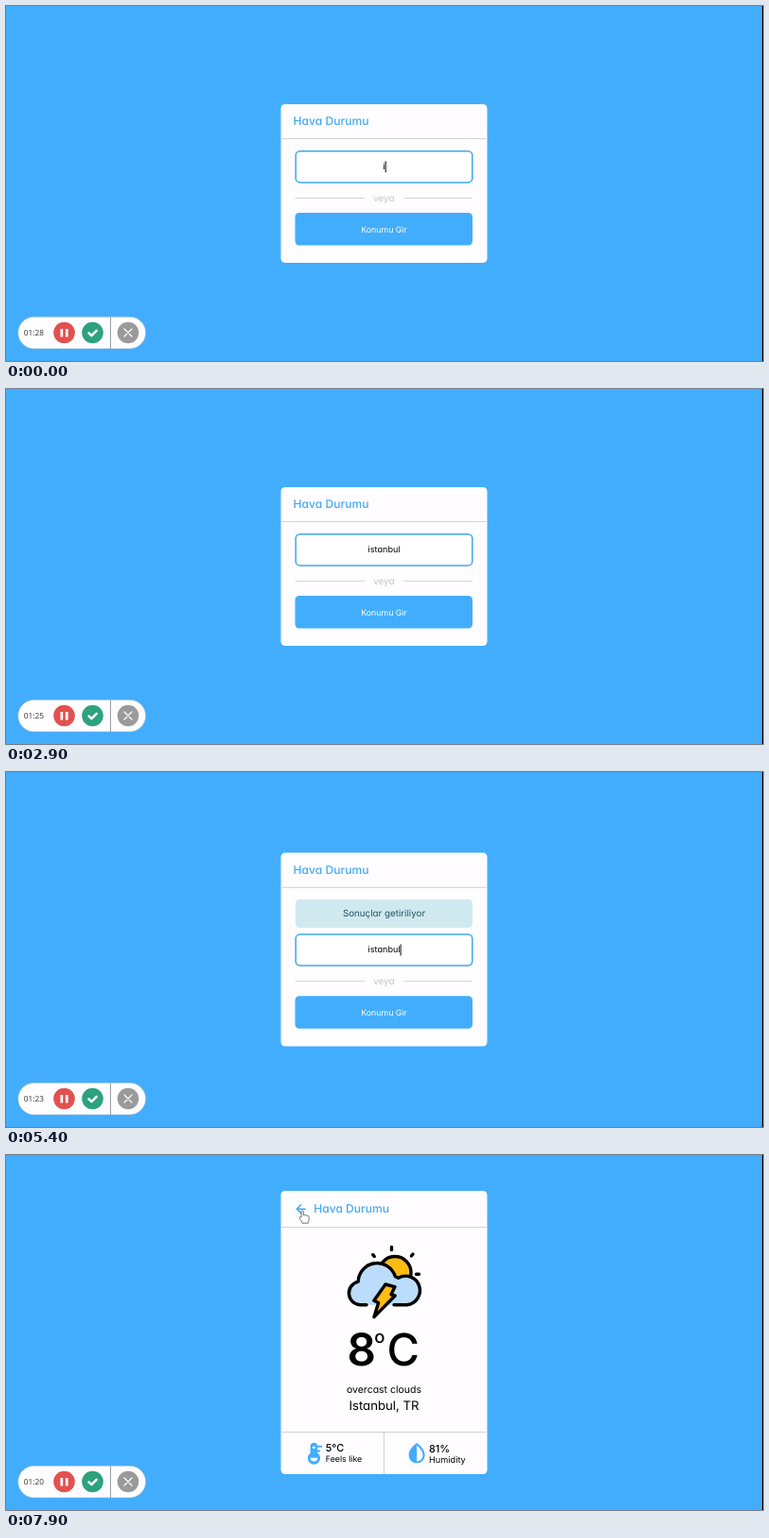
Write an HTML page that moves like this. It is 800x376 px and loops after 8 s.

```html
<!DOCTYPE html>
<html lang="tr">
<head>
<meta charset="utf-8">
<title>Hava Durumu</title>
<style>
  html, body { margin: 0; width: 100%; height: 100%; overflow: hidden; background: #42adfd; }
  svg { display: block; width: 100%; height: 100%; }
  text { font-family: Inter, sans-serif; font-feature-settings: "cv11"; text-rendering: geometricPrecision; }
  .mid { text-anchor: middle; }
  .title { font-size: 12.1px; font-weight: 500; fill: #42a9f0; }
  .stat { font-size: 10.9px; font-weight: 500; }
  .paper { fill: #fffdff; }
  .blue { fill: #42adfd; }
  .rule { stroke: #d3d2d6; fill: none; }
  .ink { stroke: #000; stroke-width: 3.4; stroke-linecap: round; stroke-linejoin: round; }
  .icon { fill: none; stroke: #fff; stroke-linecap: round; stroke-linejoin: round; }
  .pointer { fill: #fff; stroke: #555; stroke-width: .8; stroke-linejoin: round; }
</style>
</head>
<body>
<svg viewBox="0 0 800 376">
  <rect class="blue" width="800" height="376"/>
  <rect x="799" width="1" height="376"/>

  <g id="form">
    <rect id="card" class="paper" x="290.5" width="218" rx="4.5"/>
    <g id="head">
      <text class="title" x="303.6" y="126">Hava Durumu</text>
      <path class="rule" d="M290.5 140.5h218"/>
    </g>
    <g id="banner">
      <rect x="306" y="135" width="187" height="30" rx="4.5" fill="#d0e9ef"/>
      <text class="mid" x="399.5" y="153.4" font-size="9.8" fill="#21535f">Sonuçlar getiriliyor</text>
    </g>
    <g id="fields">
      <rect x="306.2" y="153.7" width="186.6" height="33.2" rx="4.5" fill="#fff" stroke="#3fa8ea" stroke-width="1.5"/>
      <text id="city" class="mid" x="399.6" y="173.3" font-size="9.1"></text>
      <rect id="caret" y="164.3" width="1" height="12"/>
      <path class="rule" d="M305.5 203.5H379M420.5 203.5H493"/>
      <text class="mid" x="399.3" y="206.8" font-size="9.9" fill="#c6c4ca">veya</text>
      <rect class="blue" x="305.5" y="219" width="187.5" height="34.5" rx="4.5"/>
      <text class="mid" x="399.5" y="239.5" font-size="8.8" fill="#fff">Konumu Gir</text>
    </g>
  </g>

  <g id="result">
    <rect class="paper" x="290.5" y="38" width="218" height="300" rx="4.5"/>
    <path d="M316.7 57.2H307.5M312 52.5l-4.7 4.7 4.7 4.7" fill="none" stroke="#42a9f0" stroke-width="1.5"/>
    <text class="title" x="325.2" y="61">Hava Durumu</text>
    <path class="rule" d="M290.5 76.5h218M290.5 293.5h218M399.5 293.5V338"/>

    <g class="ink">
      <circle cx="411" cy="124.5" r="17" fill="#fdbc12"/>
      <path d="M407.5 97.5v3M387.7 105.5l1.6 2M430 105l-1.6 2M433.5 126.2h3" fill="none"/>
      <path d="M381 158.7H374A12.4 12.4 0 0 1 372.2 134.2A20 20 0 0 1 411.3 128.6Q413 129.6 414.5 130.2A15.3 15.3 0 1 1 423.5 158.7H410" fill="#bbdcfb"/>
      <path d="M401 137l10 2.6-4 8.2 4.2 1.2-22.2 22.6 4.6-15-4.8-2.4z" fill="#fdbc12"/>
    </g>

    <text x="360.6" y="223.2" font-size="47.5" font-weight="600">8</text>
    <text x="389.2" y="199" font-size="18.5" font-weight="500">o</text>
    <text x="402.4" y="223.2" font-size="47" font-weight="500">C</text>
    <text class="mid" x="399.5" y="251.5" font-size="10.5">overcast clouds</text>
    <text class="mid" x="399.5" y="269.5" font-size="13.2">Istanbul, TR</text>

    <g transform="translate(315 304) scale(.95)">
      <path class="blue" d="M20 6V4h-5.1A4 4 0 0 0 7 5v7.3a7 7 0 1 0 8 0V11h3V9h-3V6z"/>
      <path class="paper" d="M7 17.5a4 4 0 0 0 8 0zM9.5 5h3v2h-3z"/>
    </g>
    <text class="stat" x="337.8" y="314.4">5°C</text>
    <text x="337.8" y="324.8" font-size="8.8">Feels like</text>
    <path class="blue" transform="translate(421.4 303) scale(1.06)" fill-rule="evenodd"
      d="M12 22c4.6 0 8-3.5 8-8.2C20 7.5 12.9 2.4 12 2 11.1 2.4 4 7.5 4 13.8 4 18.5 7.4 22 12 22zM12 4.3c1.7 1.4 6 5.3 6 9.5 0 3.6-2.5 6.2-6 6.2z"/>
    <text class="stat" x="447" y="315.2">81%</text>
    <text x="447" y="325.8" font-size="9.2">Humidity</text>
  </g>

  <g id="recorder">
    <rect x="12.7" y="329.2" width="135" height="33.8" rx="16.9" fill="#fffdff" stroke="#8fb6d5" stroke-width=".6"/>
    <path d="M110.5 329.5v33.5" stroke="#8d9399" stroke-width=".9"/>
    <text id="clock" x="18.8" y="349.4" font-size="8.3" fill="#333" style="font-family: 'Open Sans', sans-serif"></text>
    <circle cx="61.5" cy="346" r="11.3" fill="#e1514f"/>
    <circle cx="91.5" cy="346" r="11.3" fill="#2ca27d"/>
    <circle cx="129" cy="346" r="11.3" fill="#9a9a9b"/>
    <path d="M57.5 342h2.7v8.5h-2.7zM62.9 342h2.7v8.5h-2.7z" fill="#fff"/>
    <path class="icon" d="M87.5 346.3l2.9 2.9 5.3-5.4" stroke-width="2.5"/>
    <path class="icon" d="M125 342l8 8M133 342l-8 8" stroke-width="1.2"/>
  </g>

  <path id="arrow" class="pointer" d="M0 0v12l2.8-2.6 2 4.4 1.9-.9-2-4.2h3.8z"/>
  <path id="hand" class="pointer" d="M-1.2 7V.8C-1.2-.5 1-.5 1 .8V5c.5-1 2-.9 2.1.2.5-.8 1.9-.7 2 .4.7-.7 1.8-.3 1.8.8V9c0 2-1 2.600-1 4.200H-.2C-.3 11.500-2 10-3 8.200c-.8-1.300.7-2.400 1.800-1.200z"/>
</svg>
<script>
const LOOP = 8000;
const el = id => document.getElementById(id);
const show = (id, on) => el(id).style.display = on ? '' : 'none';
const shift = (id, x, y) => el(id).setAttribute('transform', `translate(${x} ${y})`);

const keyTimes = [0, 100, 500, 600, 1100, 1400, 1700, 2200];
const path = [[6400, 457, 178], [7100, 314, 61], [7250, 313, 55.5], [7400, 313.300, 59]];

function pointerAt(t) {
  let i = 0;
  while (i < path.length - 2 && t > path[i + 1][0]) i++;
  const [t0, x0, y0] = path[i], [t1, x1, y1] = path[i + 1];
  const p = Math.min(1, (t - t0) / (t1 - t0)), k = p * p * (3 - 2 * p);
  return [x0 + (x1 - x0) * k, y0 + (y1 - y0) * k];
}

function draw(time) {
  const t = Math.floor(time % LOOP / 100) * 100;
  const loading = t >= 3000, done = t >= 5700, moving = t >= 6400;

  el('clock').textContent = '01:' + (28 - Math.floor((t + 100) / 1000));
  show('form', !done);
  show('result', done);

  el('card').setAttribute('y', loading ? 85.5 : 104);
  el('card').setAttribute('height', loading ? 205 : 168);
  shift('head', 0, loading ? -18.200 : 0);
  shift('fields', 0, loading ? 18.200 : 0);
  show('banner', loading);

  const city = el('city');
  city.textContent = 'istanbul'.slice(0, keyTimes.filter(k => k <= t).length);
  if (!done) el('caret').setAttribute('x', 399.6 + city.getComputedTextLength() / 2);
  show('caret', t < 2700 || t >= 3200 && (t - 3200) % 1100 < 600);

  const [x, y] = pointerAt(Math.max(t, path[0][0]));
  const overBack = x < 319 && y < 66;
  shift('arrow', x, y);
  shift('hand', x, y);
  show('arrow', moving && !overBack);
  show('hand', moving && overBack);
}

function tick() {
  draw(performance.now());
  requestAnimationFrame(tick);
}
tick();
</script>
</body>
</html>
```
